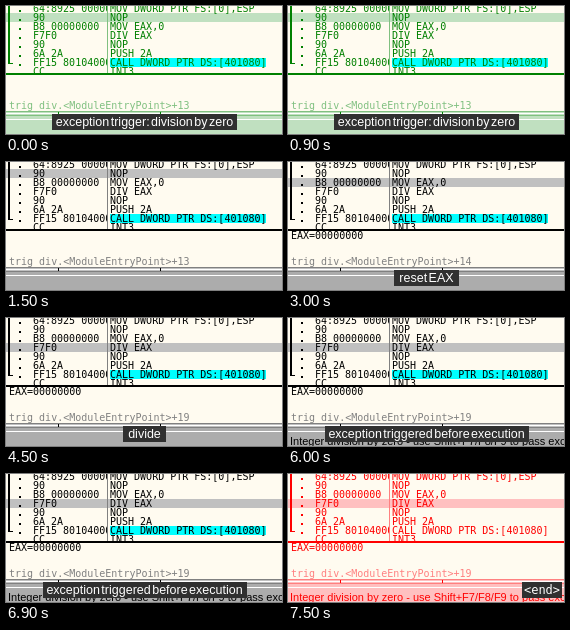
An HTML page that plays this animation: 276x128 px, repeating every 8000 ms.

```html
<!DOCTYPE html>
<html lang="en">
<head>
<meta charset="utf-8">
<title>Division by zero in a debugger</title>
<style>
html, body { margin: 0; width: 100%; height: 100%; overflow: hidden; }
svg { display: block; width: 100vw; height: 100vh; }
text { white-space: pre; }
.mono { font: 10px "DejaVu Sans Mono", monospace; }
.ui { font: 11px "Liberation Sans", sans-serif; }
.cap { font: 12.5px "Liberation Sans", sans-serif; word-spacing: -2px; }
.end { font: 12px "DejaVu Sans Mono", monospace; }
</style>
</head>
<body>
<svg id="stage" viewBox="0 0 276 128" preserveAspectRatio="none"></svg>
<script>
const LOOP = 8000;
const W = 276;
const ROW = 9;
const PAPER = '#fffbf0';
const CAPTION = '#303030';
const stage = document.getElementById('stage');

const code = [
  ['64:8925 00000000', 'MOV DWORD PTR FS:[0],ESP'],
  ['90', 'NOP'],
  ['B8 00000000', 'MOV EAX,0'],
  ['F7F0', 'DIV EAX'],
  ['90', 'NOP'],
  ['6A 2A', 'PUSH 2A'],
  ['FF15 80104000', 'CALL DWORD PTR DS:[401080]'],
  ['CC', 'INT3']
];

const plain = { ink: '#000', dim: '#808080', sel: '#c0c0c0', bar: '#acacac', call: '#00ffff' };
const green = { ink: '#008000', dim: '#80c080', sel: '#c0e0c0', bar: '#c0e0c0', call: '#00ffff' };
const red = { ink: '#ff0000', dim: '#ff8080', sel: '#ffc0c0', bar: '#ffc0c0', call: PAPER };

const scenes = [
  { at: 0, pal: green, sel: 1, offset: 13, cap: 'exception trigger: division by zero', width: 185 },
  { at: 1500, pal: plain, sel: 1, offset: 13 },
  { at: 3000, pal: plain, sel: 2, offset: 14, eax: true, cap: 'reset EAX', width: 65 },
  { at: 4500, pal: plain, sel: 3, offset: 19, eax: true, cap: 'divide', width: 43 },
  { at: 6000, pal: plain, sel: 3, offset: 19, eax: true, fault: true,
    cap: 'exception triggered before execution', width: 204 },
  { at: 7500, pal: red, sel: 3, offset: 19, eax: true, fault: true, end: true }
];

const esc = s => s.replace(/&/g, '&amp;').replace(/</g, '&lt;').replace(/>/g, '&gt;');
const rect = (x, y, w, h, fill) =>
  `<rect x="${x}" y="${y}" width="${w}" height="${h}" fill="${fill}" shape-rendering="crispEdges"/>`;
const text = (x, y, s, fill, cls = 'mono', anchor = 'start') =>
  `<text x="${x}" y="${y}" fill="${fill}" class="${cls}" text-anchor="${anchor}">${esc(s)}</text>`;
const rowTop = i => 7 + (i - 1) * ROW;

function codePane({ pal, sel }) {
  const { ink, dim } = pal;
  let hexes = '';
  let out = rect(0, 0, W, 70, PAPER) + rect(0, rowTop(sel), W, ROW, pal.sel);
  code.forEach(([hex, asm], i) => {
    const base = rowTop(i) + 8;
    if (i === 6) out += rect(104, rowTop(i), 156, ROW, pal.call);
    hexes += text(27, base, hex, ink);
    out += text(104, base, asm, ink);
    if (i < 7) out += rect(13, base - 2, 2, 2, ink);
  });
  // The nested svg clips the hex column at the divider.
  out += `<svg width="101" height="70">${hexes}</svg>`;
  out += rect(2, 0, 2, 58, ink) + rect(2, 57, 5, 1, ink);
  return out + rect(101, 0, 1, 67, dim);
}

function infoPane({ pal, offset, eax }) {
  return rect(0, 67, W, 38, PAPER) + rect(0, 67, W, 2, pal.ink) +
    (eax ? text(3, 77, 'EAX=00000000', pal.ink) : '') +
    text(3, 103, `trig_div.<ModuleEntryPoint>+${offset}`, pal.dim);
}

function statusBar({ pal, fault }) {
  return rect(0, 105, W, 23, pal.bar) + rect(0, 105, W, 5, pal.sel) +
    rect(0, 105, W, 1, pal.dim) + rect(0, 107, W, 1, '#fff') +
    rect(0, 109, W, 1, pal.dim) + rect(0, 113, W, 1, '#fff') +
    rect(52, 106, 1, 3, pal.ink) + rect(154, 106, 1, 3, pal.ink) +
    (fault ? text(2, 127, 'Integer division by zero - use Shift+F7/F8/F9 to pass exception', pal.ink, 'ui') : '');
}

function label(x, width, s, cls) {
  return rect(x - width / 2, 108, width, 16, CAPTION) + text(x, 120, s, '#fff', cls, 'middle');
}

function caption({ cap, width, end }) {
  if (end) return label(254, 40, '<end>', 'end');
  return cap ? label(138.5, width, cap, 'cap') : '';
}

let shown;
function draw(t) {
  const scene = scenes.findLast(s => s.at <= t);
  if (scene === shown) return;
  shown = scene;
  stage.innerHTML = codePane(scene) + infoPane(scene) + statusBar(scene) + caption(scene);
}

function tick() {
  draw(performance.now() % LOOP);
  requestAnimationFrame(tick);
}
tick();
</script>
</body>
</html>
```
